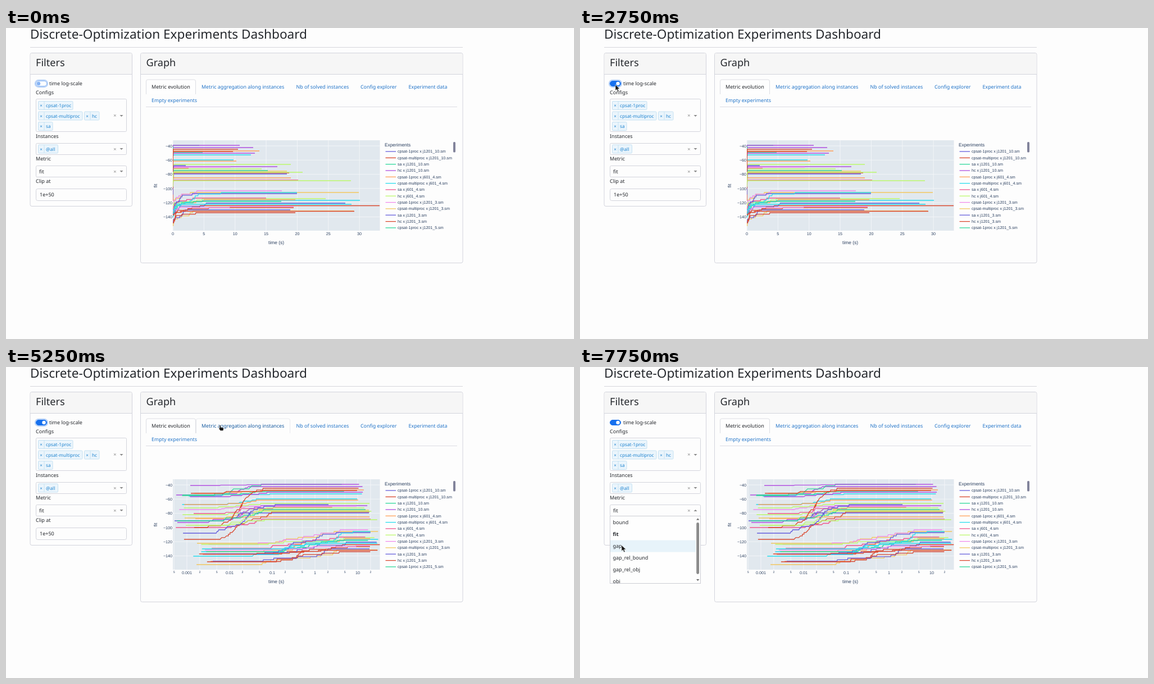
An HTML page for the animation above (8000 ms loop, 1011x554 px).

```html
<!DOCTYPE html>
<html lang="en">
<head>
<meta charset="utf-8">
<title>Dashboard</title>
<style>
html, body { margin: 0; width: 100%; height: 100%; overflow: hidden; background: #fdfdfd; }
svg { display: block; width: 1011px; height: 554px; }
text { font: 9.04px "Noto Sans", "Open Sans", sans-serif; fill: #25282d; text-rendering: geometricPrecision; white-space: pre; }
.plot text { font-family: "Liberation Sans", Arial, sans-serif; font-size: 7.15px; fill: #2a3f5f; }
.link { fill: #2073c8; }
.box { fill: #fdfdfd; stroke: #d3d4dc; }
</style>
</head>
<body>
<svg id="stage" viewBox="0 0 1011 554"></svg>
<script>
const stage = document.getElementById('stage');
const text = (x, y, s, attrs = '') => `<text x="${x}" y="${y}" ${attrs}>${s}</text>`;
const rect = (x, y, w, h, attrs = 'class="box"') => `<rect x="${x}" y="${y}" width="${w}" height="${h}" ${attrs}/>`;
const path = (d, attrs = '') => `<path d="${d}" ${attrs}/>`;
const group = (id, body, attrs = '') => `<g id="${id}" ${attrs}>${body}</g>`;
const sized = px => `style="font-size:${px}px"`;

// ---------- cards and filters ----------
function card(x, w, bottom, title) {
  return rect(x, 44.5, w, bottom - 44.5, 'class="box" rx="3"') +
    path(`M${x + .5} 82V48q0-3 3-3H${x + w - 3.5}q3 0 3 3V82z`, 'fill="#f6f6f6"') +
    path(`M${x} 82.5h${w}`, 'stroke="#d3d4dc"') +
    text(x + 10, 68, title, sized(18.1));
}

function chip(x, mid, label, right) {
  return rect(x + .5, mid - 7.5, right - x - .5, 15, 'rx="1.5" fill="#ebf5fc" stroke="#c5e1f2"') +
    path(`M${x + 11} ${mid - 7}v14`, 'stroke="#c5e1f2"') +
    text(x + 3.2, mid + 3, '×', 'style="font-size:8px;fill:#1d83cf"') +
    text(x + 14, mid + 3.2, label, 'style="font-size:8.25px;fill:#1d83cf"');
}

const caret = (y, up) => path(up ? `M202.5 ${y + 1.5}l3-3 3 3z` : `M202.5 ${y - 1.5}l3 3 3-3z`, 'fill="#888"');

function select(top, bottom) {
  const mid = (top + bottom) / 2;
  return rect(53.5, top + .5, 161, bottom - top, 'class="box" rx="2"') +
    text(191.2, mid + 3.6, '×', 'style="fill:#888"');
}

const filters = card(43, 181.5, 317.5, 'Filters') +
  text(77, 102.3, 'time log-scale') +
  text(53, 118, 'Configs') + text(53, 195.7, 'Instances') +
  text(53, 236, 'Metric') + text(53, 276.3, 'Clip at') +
  select(126, 184) + caret(156.5) + select(205, 225) + caret(215.5) + select(245, 265) +
  chip(57, 138, 'cpsat-1proc', 119) + chip(57, 156.5, 'cpsat-multiproc', 136) +
  chip(139, 156.5, 'hc', 166) + chip(57, 175, 'sa', 83) + chip(57, 215.5, '@all', 92.5) +
  rect(53.5, 286.5, 161, 21, 'class="box" rx="3"') + text(60, 300, '1e+50');

const toggle =
  group('halo', rect(52, 93, 22, 12, 'rx="6" fill="none" stroke="#b9d3f8" stroke-width="2.4"')) +
  rect(53.5, 94.5, 19, 9, 'id="track" rx="4.5"') +
  '<circle id="knob" cy="99" r="3.2"/>';

// ---------- tabs ----------
const tabs = path('M249 140.5H803', 'stroke="#dcdde3"') +
  path('M249.5 118V95q0-3 3-3H334.5q3 0 3 3V118', 'fill="#fefefe" stroke="#dcdde3"') +
  text(259, 107.8, 'Metric evolution') +
  group('tabHover', path('M338.5 118V95q0-3 3-3H502.5q3 0 3 3V118', 'fill="none" stroke="#e8e9ee"')) +
  [[348, 'Metric aggregation along instances', 'id="tabLink"'], [516.5, 'Nb of solved instances'],
   [631, 'Config explorer'], [716.5, 'Experiment data']]
    .map(([x, s, id = '']) => text(x, 107.8, s, `class="link" ${id} ${sized(8.9)}`)).join('') +
  text(259, 132.3, 'Empty experiments', `class="link" ${sized(8.9)}`);

// ---------- chart ----------
let seed = 11;
const rnd = () => (seed = seed * 16807 % 2147483647) / 2147483647;

// per colour: final y, right end on the linear axis, total rise
const runs = {
  '#665fdc': [[260, 500, 14], [295, 518, 38], [312, 604, 21], [324, 506, 22], [245, 320, 51]],
  '#d9482f': [[216, 413, 70], [220, 404, 5], [258, 504, 49], [316.5, 665, 30], [320, 512, 13], [329, 515, 18], [326.5, 620, 7]],
  '#2fd89b': [[209, 344, 19], [254, 466, 20], [309, 490, 20], [222, 350, 7]],
  '#b04fe0': [[209, 416, 2], [213, 440, 15], [223, 443, 8], [247, 483, 30]],
  '#ffa05a': [[219, 451, 6], [237, 410, 8], [267, 507, 3], [306, 515, 23]],
  '#29dced': [[226, 436, 4], [235, 405, 10], [293, 518, 44], [307, 630, 22], [314, 615, 10]],
  '#f0558c': [[271, 520, 15], [303, 463, 20], [250, 325, 11]],
  '#bdf96c': [[243, 507, 8], [251, 455, 12], [257, 528, 25], [272, 614, 10], [304, 569, 12]],
  '#f08cec': [[290, 491, 26], [318, 512, 8], [248, 400, 6]],
  '#f3c75f': [[293, 628, 21], [326, 619, 26], [255, 500, 14]]
};
const palette = Object.keys(runs);
const logX = t => 550 + 76 * Math.log10(t);
const linX = t => 297 + 11.07 * t;
const timeAt = x => 10 ** ((x - 550) / 76);

// Improving staircase, stored as [log-axis x, y].
function staircase([y, end, rise]) {
  const low = y > 280, last = logX((end - 297) / 11.07);
  const start = 300 + rnd() * 40 + (low ? 30 : 0);
  const from = low ? 430 : 355, to = Math.min(last - 6, low ? 630 : 480);
  const n = Math.round(2 + rise / 3.5);
  const at = Array.from({ length: n }, () => from + (to - from) * (rnd() + rnd()) / 2).sort((a, b) => a - b);
  const pts = [[start, y + rise]];
  at.forEach((x, k) => {
    pts.push([x, pts[pts.length - 1][1]]);
    pts.push([x + (x < 440 ? 3 : .8), y + rise * (1 - (k + 1) / n)]);
  });
  pts.push([last, y]);
  return pts.sort((a, b) => a[0] - b[0]);
}

const series = palette.flatMap(colour => runs[colour].map(run => [colour, staircase(run), rnd()]))
  .sort((a, b) => a[2] - b[2]);
const curves = mapX => series.map(([colour, pts]) =>
  path('M' + pts.map(([x, y]) => `${mapX(x).toFixed(1)} ${y.toFixed(1)}`).join('L'), `stroke="${colour}"`)).join('');
const gridX = xs => path(xs.map(x => `M${x} 200V361`).join(''), 'stroke="#f6f8fa" stroke-width=".8"');
const gridY = path([0, 1, 2, 3, 4, 5].map(i => `M297 ${210 + 25.3 * i}H665.5`).join(''), 'stroke="#f6f8fa" stroke-width=".8"');
const curveGroup = mapX => `<g clip-path="url(#area)" fill="none" stroke-width="1.3">${curves(mapX)}</g>`;
const middle = 'text-anchor="middle"';

const linearTicks = [0, 5, 10, 15, 20, 25, 30];
const linear = gridX(linearTicks.map(linX)) + gridY + curveGroup(x => linX(timeAt(x))) +
  linearTicks.map(t => text(linX(t), 369, t, middle)).join('');

const logTicks = [];
for (let e = -4; e <= 1; e++)
  for (const m of [1, 2, 5]) {
    const t = m * 10 ** e;
    if (t > 4e-4 && t < 30) logTicks.push([logX(t), m, e]);
  }
const logarithmic = gridX(logTicks.map(k => k[0])) + gridY + curveGroup(x => x) +
  logTicks.map(([x, m, e]) => m === 1
    ? text(x, 369, e < 0 ? (10 ** e).toFixed(-e) : 10 ** e, middle)
    : text(x, 367.3, m, `${middle} ${sized(5.2)}`)).join('');

const names = ['cpsat-1proc', 'cpsat-multiproc', 'sa', 'hc'];
const legendOrder = [['j1201_10', [0, 1, 2, 3]], ['j601_4', [0, 1, 2, 3]], ['j1201_3', [0, 1, 2, 3]], ['j1201_5', [0]]]
  .flatMap(([inst, ids]) => ids.map(i => `${names[i]} x ${inst}.sm`));
const legend = text(674, 211.3, 'Experiments', sized(8.3)) +
  legendOrder.map((s, i) => {
    const y = 220 + 11.33 * i;
    return path(`M675.5 ${y}h18.5`, `stroke="${palette[i === 12 ? 2 : i % 10]}" stroke-width="1.3"`) + text(697, y + 2.4, s);
  }).join('') +
  rect(796, 203, 4, 18.5, 'rx="1.5" fill="#82839b"');

const chart = `<g class="plot">` +
  rect(297, 200, 368.5, 161, 'fill="#e1e8ee"') +
  group('linear', linear) + group('log', logarithmic) +
  [40, 60, 80, 100, 120, 140].map((v, i) => text(296, 212.6 + 25.3 * i, '−' + v, 'text-anchor="end"')).join('') +
  text(481, 385, 'time (s)', `${middle} ${sized(8.35)}`) +
  text(0, 0, 'fit', `${middle} transform="translate(268.5 281) rotate(-90)" ${sized(8.35)}`) +
  legend + '</g>';

// ---------- metric menu ----------
const options = ['bound', 'fit', 'gap', 'gap_rel_bound', 'gap_rel_obj', 'obj'];
const menu = group('menu',
  rect(53.5, 265.5, 161, 120, 'fill="#fefefe" stroke="#cccdd4"') +
  rect(54, 0, 152, 21, 'id="row" fill="#e7f3fa"') +
  '<g clip-path="url(#list)">' +
  options.map((s, i) => text(58.5, 280.2 + 20.9 * i, s, i === 1 ? 'font-weight="700" style="font-weight:700"' : '')).join('') + '</g>' +
  rect(207.2, 277, 4.8, 92, 'rx="2.4" fill="#8b8b8b"') +
  path('M207 272.5l2.7-3 2.7 3zM207 378l2.7 3 2.7-3z', 'fill="#666"'));

const cursors = group('cursor',
  group('arrow', path('M0 0V10.5L2.5 8.3 4.3 12.4 6.2 11.6 4.4 7.6H7.8z')) +
  group('hand', path('M0 1q1-1.6 2 0V4.2L6 5q1.6.4 1.4 2L6.6 10.5H1.6L-1.5 6.6q0-1.2 1.5-.4z')),
  'fill="#151515" stroke="#fff" stroke-width=".6"');

stage.innerHTML =
  '<defs><clipPath id="area"><rect x="297" y="200" width="368.5" height="161"/></clipPath>' +
  '<clipPath id="list"><rect x="54" y="266" width="152" height="119"/></clipPath></defs>' +
  text(43, 19, 'Discrete-Optimization Experiments Dashboard', sized(22.6)) +
  path('M43 34.5H813', 'stroke="#d6d6dc"') +
  filters + toggle + card(239.5, 573.5, 418.5, 'Graph') + tabs + chart +
  text(59, 258.7, 'fit', 'id="metric"') +
  group('caretDown', caret(255.5)) + group('caretUp', caret(255.5, true)) +
  group('beam', path('M59.5 250V261', 'stroke="#222" stroke-width=".8"')) + menu + cursors;

// ---------- timeline ----------
const STEP = 250, LOOP = 8000;
const keys = [ // ms, x, y
  [250, 420, 540], [750, 180, 260], [1250, 80, 122], [1500, 67, 103], [2000, 63, 101], [3000, 63, 101],
  [3500, 157, 177], [3750, 207, 253], [4000, 275, 157], [4750, 380, 103], [5250, 380, 103],
  [6250, 213, 268], [6500, 210, 258], [6750, 210, 258], [7500, 67, 315], [7750, 74, 317.5]
];

function pointer(t) {
  const i = keys.findIndex(k => k[0] >= t);
  if (keys[i][0] === t) return keys[i].slice(1);
  const [t0, x0, y0] = keys[i - 1], [t1, x1, y1] = keys[i], u = (t - t0) / (t1 - t0);
  return [x0 + (x1 - x0) * u, y0 + (y1 - y0) * u];
}

const el = id => document.getElementById(id);
const show = (id, on) => el(id).setAttribute('display', on ? 'inline' : 'none');
const set = (id, attrs) => Object.entries(attrs).forEach(([k, v]) => el(id).setAttribute(k, v));

function draw(t) {
  const on = t >= 2250, log = t >= 4000, open = t >= 6500;
  show('linear', !log);
  show('log', log);
  show('halo', !open);
  set('track', { fill: on ? '#1670ee' : '#fff', stroke: on ? '#1670ee' : '#8fb9f3' });
  set('knob', { cx: on ? 67.5 : 58, fill: on ? '#fff' : '#85b3f5' });

  show('cursor', t >= STEP);
  const [x, y] = t >= STEP ? pointer(t) : [0, 0];
  const onTab = x > 338 && x < 506 && y > 92 && y < 118;
  const hand = onTab || (open && y < 266);
  set('cursor', { transform: `translate(${x} ${y})` });
  show('arrow', !hand);
  show('hand', hand);
  show('tabHover', onTab);
  el('tabLink').style.fill = onTab ? '#155a9f' : '';

  const beam = open && t < 7250;
  show('menu', open);
  show('caretUp', open);
  show('caretDown', !open);
  show('beam', beam);
  el('metric').style.fill = beam ? '#666' : '';
  const row = y > 267 ? Math.floor((y - 267) / 20.9) : 1;
  set('row', { y: 266.8 + 20.9 * row });
}

const begin = performance.now();
function tick() {
  const t = (performance.now() - begin) % LOOP;
  draw(Math.floor(t / STEP) * STEP);
  requestAnimationFrame(tick);
}
tick();
</script>
</body>
</html>
```
